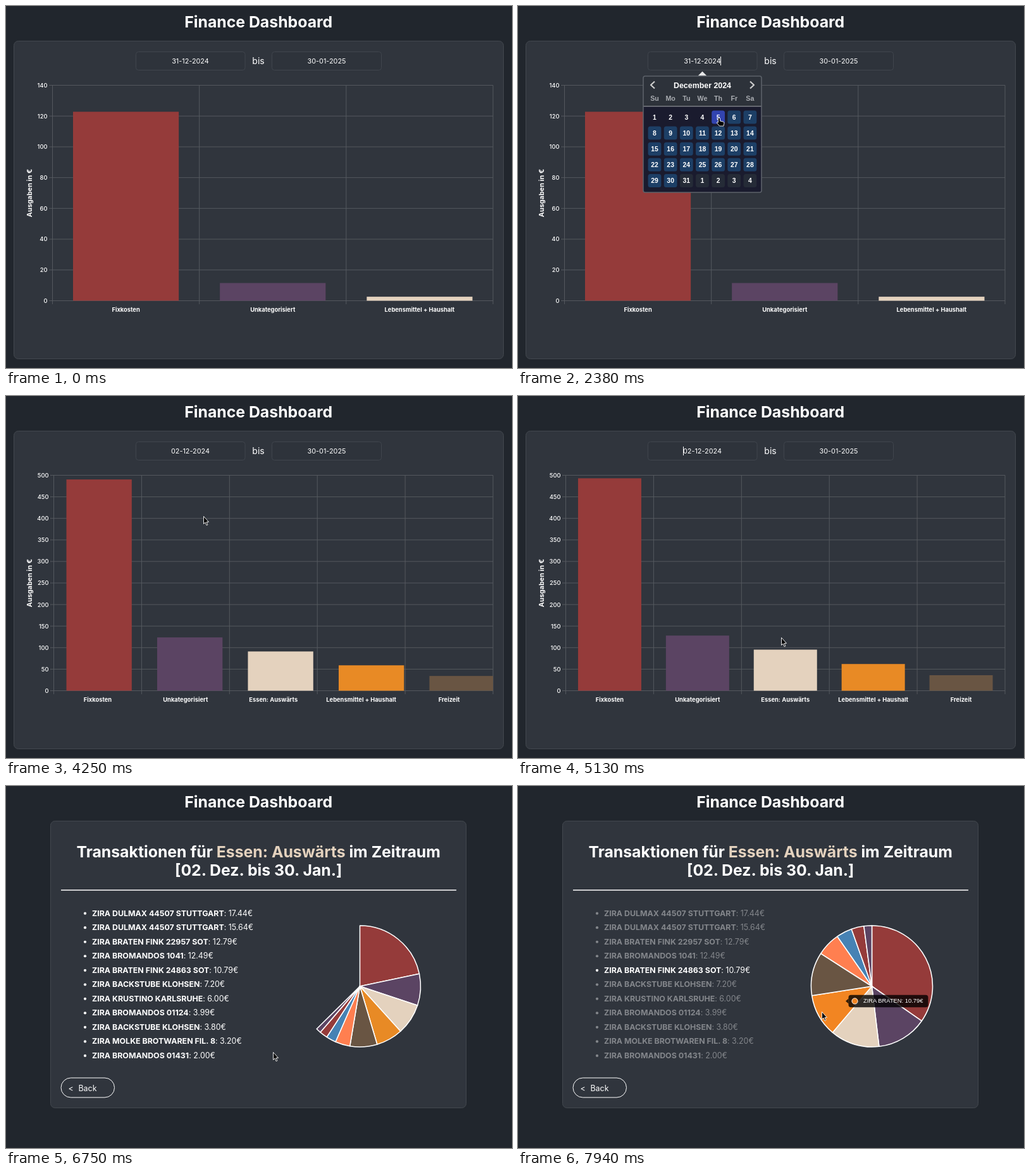
Animation of 800x573 px, one loop 8 s. Source, as an HTML page:

```html
<!DOCTYPE html>
<html lang="de">
<head>
<meta charset="utf-8">
<title>Finance Dashboard</title>
<style>
html, body { margin: 0; width: 100%; height: 100%; overflow: hidden; background: #21262d; }
svg { display: block; font-family: Inter, sans-serif; fill: #fff; }
.picker, .tip { font-family: "Liberation Sans", Arial, sans-serif; }
</style>
</head>
<body>
<svg id="stage" width="800" height="573" viewBox="0 0 800 573"></svg>
<script>
const LOOP = 8000;
const FOCUS = 1200, PICK = 3320, RELOAD = 3722, HOVER = 5330, OPEN = 6500, PIE = 6533, POINT = 7660;
const RED = '#953b3a', PURPLE = '#5b4463', BEIGE = '#e4d2be', ORANGE = '#e88a25', BROWN = '#695543';
const COLORS = [RED, PURPLE, BEIGE, ORANGE, BROWN, '#ff7f50', '#4682b4', RED, PURPLE];

// Font sizes
const HEAD = 24.8, BIG = 13.95, BODY = 12.4, SMALL = 10.85, TINY = 9.35;

const BEFORE = { left: 73.5, max: 140, step: 20, values: [122.8, 11.5, 2.6],
  labels: ['Fixkosten', 'Unkategorisiert', 'Lebensmittel + Haushalt'] };
const AFTER = { left: 75.5, max: 500, step: 50, values: [493, 128, 95.34, 62, 36],
  labels: ['Fixkosten', 'Unkategorisiert', 'Essen: Auswärts', 'Lebensmittel + Haushalt', 'Freizeit'] };
const RIGHT = 770, TOP = 125.5, BASE = 466.5;

const ITEMS = [
  ['ZIRA DULMAX 44507 STUTTGART', 17.44], ['ZIRA DULMAX 44507 STUTTGART', 15.64],
  ['ZIRA BRATEN FINK 22957 SOT', 12.79], ['ZIRA BROMANDOS 1041', 12.49],
  ['ZIRA BRATEN FINK 24863 SOT', 10.79], ['ZIRA BACKSTUBE KLOHSEN', 7.2],
  ['ZIRA KRUSTINO KARLSRUHE', 6], ['ZIRA BROMANDOS 01124', 3.99],
  ['ZIRA BACKSTUBE KLOHSEN', 3.8], ['ZIRA MOLKE BROTWAREN FIL. 8', 3.2],
  ['ZIRA BROMANDOS 01431', 2]];
const PICKED = 4;

// Pie slices: equal names are added up
const sums = new Map();
for (const [name, value] of ITEMS) sums.set(name, (sums.get(name) || 0) + value);
const SLICES = [...sums.values()];
const TOTAL = SLICES.reduce((a, b) => a + b);

// Pointer stops: time, x, y
const PATH = [[190, 796, 348], [490, 400, 191], [750, 400, 191], [1140, 346, 88], [1260, 346, 88],
  [1490, 356, 130], [1570, 356, 130], [1750, 373, 160], [1940, 373, 160], [2350, 318, 177],
  [2450, 318, 177], [3200, 240, 175], [3570, 239, 173], [3750, 239, 173], [4250, 312, 190],
  [4380, 312, 190], [5100, 416, 382], [5190, 416, 382], [5520, 422, 421], [7250, 422, 421],
  [7780, 480, 357]];

const clamp = v => Math.max(0, Math.min(1, v));
const mix = (a, b, k) => a + (b - a) * k;
const easeOut = p => 1 - (1 - clamp(p)) ** 4;
const smooth = p => p * p * (3 - 2 * p);
const euro = v => v.toFixed(2) + '€';

// Text centred vertically on y by its capitals
const text = (x, y, size, s, { anchor = 'start', weight = 400, fill = '#fff' } = {}) =>
  `<text x="${x}" y="${y + size * .364}" font-size="${size}" font-weight="${weight}" text-anchor="${anchor}" fill="${fill}">${s}</text>`;
const mid = (x, y, size, s, weight = 400, fill = '#fff') => text(x, y, size, s, { anchor: 'middle', weight, fill });
const end = (x, y, size, s, weight = 400) => text(x, y, size, s, { anchor: 'end', weight });
const box = (x, y, w, h, r, fill, stroke = 'none', sw = 1) =>
  `<rect x="${x}" y="${y}" width="${w}" height="${h}" rx="${r}" fill="${fill}" stroke="${stroke}" stroke-width="${sw}"/>`;
const path = (d, stroke, sw = 1, fill = 'none') =>
  `<path d="${d}" stroke="${stroke}" stroke-width="${sw}" fill="${fill}" stroke-linejoin="round"/>`;
const card = (x, w, h) => box(x, 55.5, w, h, 7, '#30353d', '#43484f');

function pointer(t) {
  const i = PATH.findIndex(p => p[0] > t);
  if (i < 0) return PATH[PATH.length - 1].slice(1);
  const [t0, x0, y0] = PATH[i - 1], [t1, x1, y1] = PATH[i];
  const k = smooth((t - t0) / (t1 - t0));
  return [mix(x0, x1, k), mix(y0, y1, k)];
}

function drawPointer([x, y], hand) {
  const shape = hand
    ? 'M-1.6.8Q0-1 1.5.8V5l4.9 1.2q1.7.5 1.5 2.2l-.9 4.6H.6l-4.4-5.2q.3-1.7 2.2-.5z'
    : 'M.5.5V12.4l2.6-2.4 1.9 4.6 1.9-.8-1.9-4.4H8.5z';
  return `<g transform="translate(${x} ${y})">${path(shape, '#fff', .9, '#000')}</g>`;
}

function inputs(t) {
  let s = box(205.5, 72.5, 172.5, 29, 4, '#2e333b', '#40454d') + box(420.5, 72.5, 173, 29, 4, '#2e333b', '#40454d')
    + mid(291.5, 87, SMALL, t < PICK ? '31-12-2024' : '02-12-2024')
    + mid(399, 87, BIG, 'bis') + mid(507, 87, SMALL, '30-01-2025');
  const blink = t < PICK ? (t - 1190) % 1000 < 500 : t < 4190 || (t - 4190) % 1000 >= 500;
  if (t >= FOCUS && blink) s += path(`M${t < PICK ? 320.5 : 261.5} 80V94`, '#fff');
  return s;
}

function barBox({ left, max, labels }, values, i) {
  const slot = (RIGHT - left) / labels.length, w = slot * .72;
  return [left + (i + .5) * slot - w / 2, BASE - (values[i] || 0) / max * (BASE - TOP), w];
}

function chart(t) {
  const data = t < RELOAD ? BEFORE : AFTER, { left, max, step, values, labels } = data;
  const slot = (RIGHT - left) / values.length, k = easeOut((t - RELOAD) / 1000);
  let grid = '', s = '';
  for (let v = 0; v <= max; v += step) {
    const y = mix(BASE, TOP, v / max);
    grid += `M${left - 5.5} ${y}H${RIGHT}`;
    s += end(left - 8, y, TINY, v, 500);
  }
  for (let i = 0; i <= values.length; i++) grid += `M${left + i * slot} ${TOP}V472`;
  s += path(grid, '#585d63', .9);
  values.forEach((_, i) => {
    const from = barBox(BEFORE, BEFORE.values, i), to = barBox(data, values, i);
    const [x, y, w] = from.map((v, j) => mix(v, to[j], k));
    const lit = i === 2 && t >= HOVER;
    if (x < RIGHT) s += box(x, y, Math.min(w, RIGHT - x), BASE - y, 0, lit ? '#e8c094' : COLORS[i]);
    s += mid(left + (i + .5) * slot, 480.5, TINY, labels[i], 700);
  });
  return s + `<g transform="translate(37 296) rotate(-90)">${mid(0, 0, SMALL, 'Ausgaben in €', 700)}</g>`;
}

function barTip(t) {
  if (t < HOVER) return '';
  let s = box(423, 401.5, 187.5, 137, 4, 'rgba(0,0,0,.82)')
    + text(431, 418, BIG, 'Essen: Auswärts: 95.34€', { weight: 700 })
    + path('M431 438.5H603', '#fff', 1.5)
    + text(431, 454, SMALL, 'Top 5 Ausgaben:', { weight: 700 });
  ITEMS.slice(0, 5).forEach(([name, value], i) => {
    const y = 470.5 + i * 13.4;
    s += text(431, y, SMALL, name.slice(0, 15).trim() + ' [...]') + end(603, y, SMALL, euro(value));
  });
  return `<g opacity="${easeOut((t - HOVER) / 300)}">${s}</g>`;
}

function hoveredDay([x, y]) {
  const col = Math.round((x - 216) / 25.15), row = Math.round((y - 176) / 25.1);
  return row >= 0 && row < 5 && col >= 0 && col < 7 ? row * 7 + col + 1 : 0;
}

function picker(day) {
  let s = path('M284.5 110.5L291.5 103.5L298.5 110.5z', 'none', 0, '#e6e7e8')
    + box(198, 111, 187, 184, 3, '#1a1b2e') + path('M198 159V111H385V159z', 'none', 0, '#2d323a')
    + path('M198 158.8H385', '#a5a8ac') + box(198, 111, 187, 184, 3, 'none', '#5c6169', 1.6)
    + mid(291.5, 125.5, 12.4, 'December 2024', 700)
    + path('M216 119.5L210 125L216 130.5M367 119.5L373 125L367 130.5', '#ccc', 2.2);
  ['Su', 'Mo', 'Tu', 'We', 'Th', 'Fr', 'Sa'].forEach((name, i) =>
    s += mid(216 + i * 25.15, 146, 10.7, name, 700, '#a9acb1'));
  for (let i = 0; i < 35; i++) {
    const d = i + 1, x = 216 + i % 7 * 25.15, y = 176 + Math.floor(i / 7) * 25.1;
    const fill = d === day ? '#3244b0' : d > 30 ? '#252b37' : day && d > day ? '#1d3f66' : '';
    if (fill) s += box(x - 10.4, y - 10.5, 20.8, 21, 3.5, fill);
    s += mid(x, y, 10.4, d > 31 ? d - 31 : d, 700);
  }
  return `<g class="picker">${s}</g>`;
}

function pie(t) {
  const cx = 559.5, cy = 317, r = 96, k = easeOut((t - PIE) / 1000);
  const at = a => `${cx + r * Math.sin(a)} ${cy - r * Math.cos(a)}`;
  const lit = '#f28522';
  let s = '', a = 0;
  if (k > 0) SLICES.forEach((v, i) => {
    const b = a + v / TOTAL * 2 * Math.PI * k;
    s += path(`M${cx} ${cy}L${at(a)}A${r} ${r} 0 0 1 ${at(b)}z`, '#fff', 1.55, i === 3 && t >= POINT ? lit : COLORS[i]);
    a = b;
  });
  if (t >= POINT) {
    s += `<g class="tip" opacity="${easeOut((t - POINT) / 300)}">`
      + box(522.5, 330.8, 126, 19.4, 4, 'rgba(0,0,0,.8)') + path('M522.5 336.5L518 340.5L522.5 344.5z', 'none', 0, 'rgba(0,0,0,.8)')
      + `<circle cx="532.5" cy="340.5" r="4.6" fill="${lit}" stroke="#fff"/>`
      + text(546, 340, TINY, 'ZIRA BRATEN: 10.79€') + '</g>';
  }
  return s;
}

function details(t) {
  let s = card(70.5, 657, 454)
    + mid(399.2, 103.5, HEAD, `Transaktionen für <tspan fill="${BEIGE}">Essen: Auswärts</tspan> im Zeitraum`, 700)
    + mid(399.2, 133, HEAD, '[02. Dez. bis 30. Jan.]', 700)
    + path('M87 164.7H712', '#fff', 1.5);
  ITEMS.forEach(([name, value], i) => {
    const y = 201 + i * 22.52, dim = t >= POINT && i !== PICKED;
    s += `<g opacity="${dim ? .4 : 1}"><circle cx="125" cy="${y + .7}" r="2.1"/>`
      + text(136, y, BODY, `<tspan font-weight="700">${name}</tspan>: ${euro(value)}`) + '</g>';
  });
  return s + box(87, 462, 84.5, 31, 15.5, 'none', '#fff')
    + text(98.5, 478, BODY, '&lt;') + text(114.5, 478, BODY, 'Back') + pie(t);
}

function scene(t) {
  const tip = t >= 190 && pointer(t);
  let s = mid(399.2, 25, HEAD, 'Finance Dashboard', 700), hand = false;
  if (t < OPEN) {
    s += card(12.5, 774, 503) + inputs(t) + chart(t) + barTip(t);
    if (t >= FOCUS && t < PICK) {
      const day = hoveredDay(tip);
      hand = day > 0;
      s += picker(day);
    }
  } else s += details(t);
  return tip ? s + drawPointer(tip, hand) : s;
}

const stage = document.getElementById('stage');
let shown = '';
function frame() {
  const s = scene(performance.now() % LOOP);
  if (s !== shown) stage.innerHTML = shown = s;
  requestAnimationFrame(frame);
}
frame();
</script>
</body>
</html>
```
